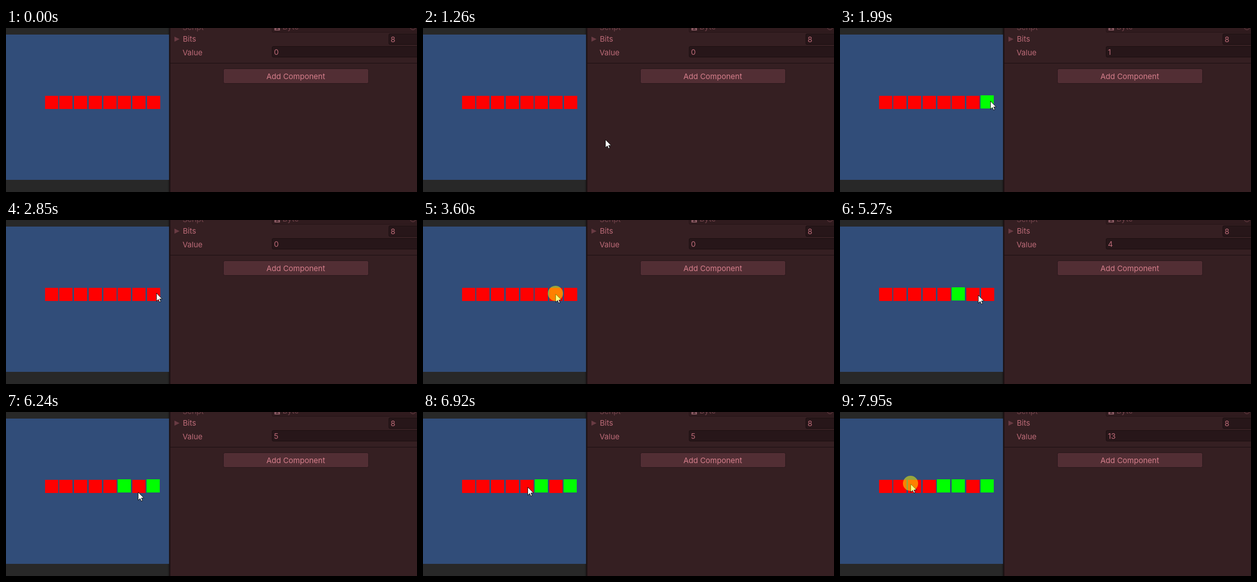
An HTML page that plays this animation: 810 px wide and 324 px high, repeating every 8 s.

```html
<!DOCTYPE html>
<html lang="en">
<head>
<meta charset="utf-8">
<title>Byte toggles</title>
<style>
  html, body { margin: 0; width: 100%; height: 100%; overflow: hidden; background: #282828; }
  svg { display: block; width: 810px; height: 324px; }
  text { font: 15px Inter, "Open Sans", sans-serif; fill: #bd6b78; }
  .dim { fill: #72434b; }
  .field { fill: #271619; stroke: #1a0e10; }
  .off { fill: #f00; }
  .on { fill: #0f0; }
</style>
</head>
<body>
<svg viewBox="0 0 810 324">
  <defs>
    <linearGradient id="edge">
      <stop offset="0" stop-color="#1c1c1c" stop-opacity="0"/>
      <stop offset="1" stop-color="#1c1c1c"/>
    </linearGradient>
  </defs>

  <!-- game view -->
  <rect width="322" height="324" fill="#282828"/>
  <rect x="318" width="4" height="324" fill="url(#edge)"/>
  <rect y="13" width="321.5" height="287" fill="#314d79"/>
  <g id="bits"></g>

  <!-- inspector -->
  <rect x="322" width="488" height="324" fill="#351f22"/>
  <rect x="321.5" width="2.5" height="324" fill="#1c1113"/>
  <rect x="524.5" y="-10.5" width="300" height="19" rx="2.5" fill="#301b1e" stroke="#251417"/>
  <text class="dim" x="348" y="4">Script</text>
  <rect x="529" y="-6" width="11" height="11" rx="1" fill="#8a5a63"/>
  <path d="M532 2.5h5M533 0h3" stroke="#301b1e" stroke-width="1.5"/>
  <text class="dim" x="545" y="3">Byte</text>
  <circle cx="802" cy="-2" r="5.5" fill="none" stroke="#72434b"/>
  <path d="M332 17V27L342 22Z" fill="#693b43"/>
  <text x="348.5" y="26.5">Bits</text>
  <rect class="field" x="754.5" y="11.5" width="70" height="21" rx="2.5"/>
  <text x="758" y="28">8</text>
  <text x="348" y="53.5">Value</text>
  <rect class="field" x="524.5" y="36.5" width="300" height="21" rx="2.5"/>
  <text id="value" x="528" y="53">0</text>
  <rect x="324" y="69" width="486" height="1" fill="#1a0f11"/>
  <rect x="428.5" y="80.5" width="286" height="29" rx="3" fill="#522e34" stroke="#27161a"/>
  <text x="571" y="101" text-anchor="middle" style="fill:#d67f8c">Add Component</text>

  <g id="cursor">
    <path d="M.5 1.5V17.5L4.2 13.9L6.6 19.2L9.2 18.1L6.8 13H11.8Z" fill="#fff" stroke="#111"/>
    <circle id="press" r="15" fill="#ff0" fill-opacity=".5"/>
  </g>
</svg>
<script>
  const LOOP = 8000, TICK = 70, COUNT = 8;
  const $ = id => document.getElementById(id);

  // Each stop: leave time, arrival time, x, y; the path runs on from the stop before
  const entry = { x: 415, y: 299 };
  const stops = [
    [1120, 1460, 306, 142],
    [1530, 1600, 296, 143],
    [2930, 3200, 261, 145],
    [4590, 4800, 233, 146],
    [5130, 5270, 272, 147],
    [5270, 5830, 288, 152],
    [6030, 6240, 260, 157],
    [6240, 6720, 207, 153],
    [6780, 6920, 206, 147],
    [7060, 7610, 142, 142],
    [7610, 7750, 139, 141]
  ].map(([leave, arrive, x, y]) => ({ leave, arrive, x, y }));

  // Each click flips its bit one tick before release
  const clicks = [
    [1860, 1990, 0], [2650, 2790, 0], [3600, 3800, 1], [4260, 4460, 1],
    [5060, 5200, 2], [5960, 6100, 0], [6990, 7130, 3], [7950, 8090, 5]
  ].map(([down, up, bit]) => ({ down, up, bit }));

  const cells = Array.from({ length: COUNT }, () => {
    const cell = document.createElementNS("http://www.w3.org/2000/svg", "rect");
    cell.setAttribute("width", 26);
    cell.setAttribute("height", 26);
    return $("bits").appendChild(cell);
  });

  function position(t) {
    const i = stops.findLastIndex(s => t >= s.leave);
    if (i < 0) return null;
    const to = stops[i], from = stops[i - 1] || entry;
    const ticks = Math.round((to.arrive - to.leave) / TICK);
    const passed = Math.floor((t - to.leave) / (to.arrive - to.leave) * ticks + 0.05);
    const p = 1 - (1 - Math.min(1, passed / ticks)) ** 1.4;
    return ["x", "y"].map(k => Math.round(from[k] + (to[k] - from[k]) * p));
  }

  function draw(t) {
    const at = position(t);
    $("cursor").style.display = at ? "" : "none";
    if (at) $("cursor").setAttribute("transform", `translate(${at})`);

    const pressed = clicks.some(c => t >= c.down && t < c.up);
    $("press").style.display = pressed ? "" : "none";

    const value = clicks.reduce((v, c) => t >= c.up - TICK ? v ^ (1 << c.bit) : v, 0);
    $("value").textContent = value;
    cells.forEach((cell, bit) => {
      const on = value >> bit & 1;
      const left = (on ? 76.3 : 76.8) + 28.68 * (COUNT - 1 - bit);
      cell.setAttribute("class", on ? "on" : "off");
      cell.setAttribute("x", Math.round(left));
      cell.setAttribute("y", on ? 133 : 134);
    });
  }

  const origin = performance.now();
  function frame() {
    draw((performance.now() - origin) % LOOP);
    requestAnimationFrame(frame);
  }
  frame();
</script>
</body>
</html>
```
